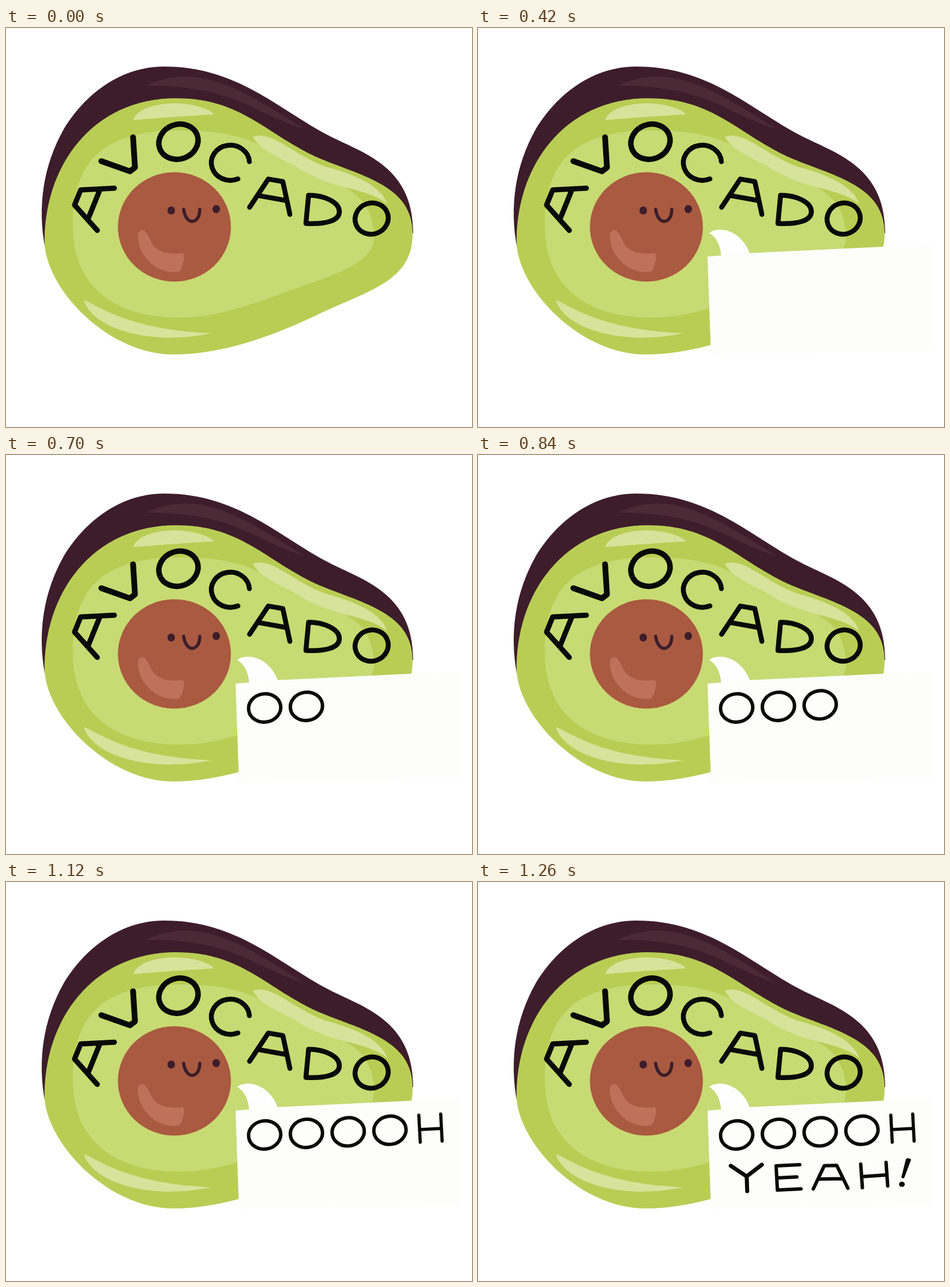
An HTML page with a canvas that plays this animation: 808x693 px, repeating every 2100 ms.

```html
<!DOCTYPE html>
<html lang="en">
<head>
<meta charset="utf-8">
<title>Avocado</title>
<style>
  html, body { margin: 0; width: 100%; height: 100%; overflow: hidden; background: #fff; }
  canvas { display: block; }
</style>
</head>
<body>
<canvas id="stage" width="808" height="693"></canvas>
<script>
const ctx = document.getElementById('stage').getContext('2d');
const LOOP = 2100, BUBBLE_AT = 420, STEP = 140;
const INK = '#090a07', SKIN = '#3d1d2a', SHINE = '#d7e39a';

// Letter strokes in a unit box centred on the origin.
const GLYPHS = {
  A: 'M-.5 .5L-.17 -.5H.19L.5 .5M-.35 .08H.36',
  V: 'M-.5 -.5L-.08 .5H.08L.5 -.5',
  O: 'M.5 0A.5 .5 0 1 1 -.5 0A.5 .5 0 1 1 .5 0Z',
  C: 'M.5 -.03A.5 .5 0 1 0 .2 .46',
  D: 'M-.42 -.5L-.5 .5C.1 .54 .5 .4 .5 .08C.5 -.26 .05 -.5 -.42 -.5Z',
  H: 'M-.5 -.5V.5M.5 -.5V.5M-.5 .03H.5',
  Y: 'M-.5 -.5L0 -.07L.5 -.5M0 -.07V.5',
  E: 'M.5 -.5H-.5V.5H.5M-.5 0H.35'
};

function fill(d, color) {
  ctx.fillStyle = color;
  ctx.fill(new Path2D(d));
}

function disc(x, y, rx, ry, color) {
  ctx.beginPath();
  ctx.ellipse(x, y, rx, ry, 0, 0, Math.PI * 2);
  ctx.fillStyle = color;
  ctx.fill();
}

function stroke(path, width, color = INK) {
  ctx.lineWidth = width;
  ctx.strokeStyle = color;
  ctx.stroke(path);
}

// The path is transformed before stroking, so the pen width stays even.
function letter(name, x, y, w, h, degrees, pen) {
  const path = new Path2D();
  const box = new DOMMatrix().translate(x, y).rotate(degrees).scale(w, h);
  path.addPath(new Path2D(GLYPHS[name]), box);
  stroke(path, pen);
}

function drawFruit() {
  fill(`M67 378C55 310 64 240 100 176C135 118 195 68 272 67C400 66 470 140 560 187
    C620 218 706 240 706 356L600 420H100Z`, SKIN);
  fill('M243 100C330 60 400 100 517 175C430 150 400 100 243 100Z', '#4b2a35');
  fill(`M67 378C64 240 150 122 295 122C410 122 450 185 545 227C620 258 705 275 705 356
    C706 440 630 455 540 498C455 539 370 567 290 567C180 567 75 460 67 378Z`, '#b9cd55');
  fill(`M116 345C114 222 180 178 300 178C440 176 460 225 545 258C600 278 638 300 638 365
    C638 410 560 432 470 464C400 490 350 503 300 503C190 503 116 450 116 345Z`, '#c8da73');
  fill('M220 160C235 122 335 124 361 150Q290 154 220 160Z', SHINE);
  fill(`M428 189C460 176 500 222 555 241C610 256 650 275 661 305
    C620 275 560 281 500 239C475 226 440 212 428 189Z`, SHINE);
  fill('M135 473C150 475 205 525 357 530C250 553 150 522 135 473Z', SHINE);
}

function drawPit() {
  disc(292, 345.5, 98, 95, '#a95a40');
  fill('M229 355C240 345 243 355 255 377C268 392 285 393 307 391Q312 400 302 422C270 432 225 400 229 355Z', '#bf7259');
  disc(286.5, 317, 6.5, 7, SKIN);
  disc(364.5, 314.5, 6.5, 7, SKIN);
  stroke(new Path2D('M308 315C310 328 316 336 323 336C331 335 336 327 336 315'), 5.5, SKIN);
}

function drawTitle() {
  letter('A', 148.5, 305, 79, 53, -68, 9);
  letter('V', 206, 228, 69, 44, -37, 10);
  letter('O', 299, 197.5, 69, 60, -20, 9.5);
  letter('C', 389, 234, 66, 61, 0, 8.5);
  letter('A', 462, 291, 71, 54, 10, 8.5);
  letter('D', 549, 315, 58, 49, 0, 8.5);
  letter('O', 634, 331, 58, 54, -20, 8.5);
}

function drawBubble() {
  fill('M401 356C409 349 426 348 440 355C455 362 466 377 471 391V400H422C421 377 413 363 401 356Z', '#fefefe');
  fill('M398 397L471 391L700 380L788 377L789 560L404 568Z', '#fdfdfc');
}

function drawYeah() {
  letter('Y', 466, 514.5, 54, 45, -2, 7);
  letter('E', 538.5, 513, 41, 42, -3, 6);
  letter('A', 611, 512.5, 60, 40, -1, 6);
  letter('H', 687, 509, 44, 41, -4, 6);
  fill('M742 481Q746 478 751 482L739 514Q736 516 734 513Z', INK);
  disc(735, 525, 5, 4.5, INK);
}

function draw(now) {
  const step = Math.floor((now % LOOP - BUBBLE_AT) / STEP);
  ctx.fillStyle = '#fff';
  ctx.fillRect(0, 0, 808, 693);
  ctx.lineCap = ctx.lineJoin = 'round';
  drawFruit();
  drawPit();
  drawTitle();
  if (step >= 0) drawBubble();
  for (let i = 0; i < Math.min(step, 4); i++) {
    letter('O', 448.5 + 72.4 * i, 439.3 - 2.7 * i, 56, 49, -9, 6);
  }
  if (step >= 5) letter('H', 736, 427.5, 38, 47, -3, 5.5);
  if (step >= 6) drawYeah();
}

const start = performance.now();
function tick() {
  draw(performance.now() - start);
  requestAnimationFrame(tick);
}
tick();
</script>
</body>
</html>
```
